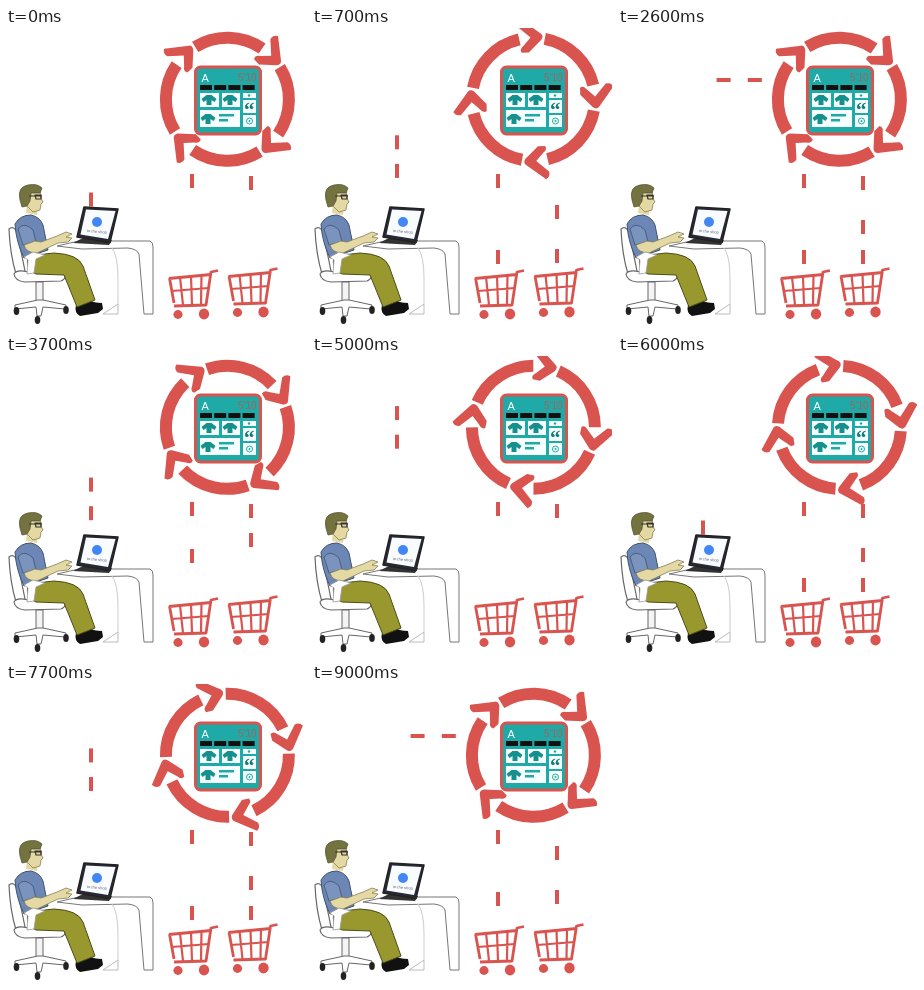
An HTML page with a canvas that plays this animation: 300x300 px, repeating every 9.2 s.

```html
<!DOCTYPE html>
<html lang="en">
<head>
<meta charset="utf-8">
<title>Online shop flow</title>
<style>
html, body { margin: 0; width: 100%; height: 100%; overflow: hidden; background: #fff; }
canvas { display: block; width: 300px; height: 300px; }
</style>
</head>
<body>
<canvas id="stage" width="300" height="300"></canvas>
<script>
const ctx = document.getElementById('stage').getContext('2d');
const RED = '#d9534f', TEAL = '#20aaa7', SKIN = '#e4d9a2', LINE = '#666';
const SANS = '"Liberation Sans", Arial, sans-serif';
const LOOP = 9200, CYCLE = 1700, STEP = 200;
const TAU = Math.PI * 2, RAD = Math.PI / 180;

function rect(x, y, w, h, color) {
  ctx.fillStyle = color;
  ctx.fillRect(x, y, w, h);
}

function shape(path, fill, stroke, width = 1) {
  const p = new Path2D(path);
  if (fill) { ctx.fillStyle = fill; ctx.fill(p); }
  if (stroke) { ctx.strokeStyle = stroke; ctx.lineWidth = width; ctx.stroke(p); }
}

function oval(x, y, rx, ry, color) {
  ctx.fillStyle = color;
  ctx.beginPath();
  ctx.ellipse(x, y, rx, ry, 0, 0, TAU);
  ctx.fill();
}

function text(str, x, y, font, color) {
  ctx.font = font;
  ctx.fillStyle = color;
  ctx.fillText(str, x, y);
}

// Six quick steps, then a longer rest on the seventh.
function stepAt(t) {
  const u = t + 100;
  return 7 * Math.floor(u / CYCLE) + Math.min(6, Math.floor(u % CYCLE / STEP));
}

// Four arrows: a body and a loose chevron each, turning a little unevenly.
function drawRing(n) {
  const turn = n - (n >= 13) - (n >= 32);
  const angle = -33 + 30 * turn + 10 * Math.cos(30 * (turn - 3.5) * RAD);
  ctx.save();
  ctx.translate(221.4, 71.3);
  ctx.rotate(angle * RAD);
  ctx.lineCap = 'butt';
  for (let i = 0; i < 4; i++) {
    ctx.strokeStyle = RED;
    ctx.lineWidth = 12;
    ctx.beginPath();
    ctx.arc(0, 0, 61.5, -86 * RAD, -20 * RAD);
    ctx.stroke();
    shape('M45 -17 Q48 -20 52 -16 L61 -10 L70 -24 Q75 -26 78 -22 L66 0 Q64 3 60 1 L46 -10 Z', RED);
    ctx.rotate(Math.PI / 2);
  }
  ctx.restore();
}

function shirt(x, y) {
  shape(`M${x} ${y} h3 l5 4 l-2 3 l-3 -2 v5 h-5 v-5 l-3 2 l-2 -3 l5 -4 Z`, '#15908d');
}

function drawPanel() {
  ctx.beginPath();
  ctx.roundRect(189.5, 39, 65, 67, 5);
  ctx.fillStyle = TEAL;
  ctx.fill();
  ctx.strokeStyle = RED;
  ctx.lineWidth = 3;
  ctx.stroke();
  text('A', 195.5, 54, '11px ' + SANS, '#fff');
  text("5'10", 232, 53, '10px ' + SANS, '#a8605a');
  for (let i = 0; i < 4; i++) rect(194 + 14.2 * i, 57, 12, 5, '#111');
  const tiles = [[194, 65, 19, 14], [216, 65, 18, 14], [237, 65, 13, 5],
    [237, 72, 13, 13], [237, 87, 13, 12], [194, 82, 40, 17]];
  for (const [x, y, w, h] of tiles) rect(x, y, w, h, '#f5ffff');
  shirt(202.5, 67);
  shirt(223.5, 67);
  shirt(201.5, 86);
  rect(213, 86, 15, 2.5, TEAL);
  rect(213, 91, 9, 2.5, TEAL);
  oval(243, 67.5, 1.2, 1.2, TEAL);
  text('“', 238, 89, 'bold 21px "Liberation Serif", serif', '#147a78');
  ctx.strokeStyle = TEAL;
  ctx.lineWidth = 1;
  ctx.beginPath();
  ctx.arc(243.5, 93, 3, 0, TAU);
  ctx.stroke();
  oval(243.5, 93, 1, 1, TEAL);
}

function drawCart(dx, dy) {
  ctx.save();
  ctx.translate(dx, dy);
  ctx.lineJoin = 'round';
  shape('M212 242.5 L205 244 L200 277 L168 278 M163 250.5 L205 246.5 M163.5 250 L168 275', null, RED, 2.8);
  shape('M174 249 L177 277 M185 248 L186 277 M195.5 247 L195 276 M165.5 263 L203 260', null, RED, 2.2);
  oval(172, 286.5, 4.6, 4.4, RED);
  oval(198, 286, 5.2, 5.4, RED);
  ctx.restore();
}

function drawChair() {
  ctx.lineJoin = 'round';
  shape('M3 201 Q7 197 11 204 L19 243 Q17 252 10 246 Q4 226 3 201 Z', '#fff', LINE, 1.2);
  shape('M8 246 Q11 241 22 244 L56 245 Q63 249 55 253 L19 254 Q9 253 8 246 Z', '#fff', LINE, 1.2);
  shape('M30 254 H37 V275 H30 Z', '#f4f4f4', LINE);
  shape('M32 272 L9 277 L9 281 L30 279 L31 288 H35 L37 279 L59 281 L60 277 L37 272 Z', '#fff', LINE);
  for (const [x, y] of [[10.5, 283], [31.5, 292], [60, 282]]) oval(x, y, 2.8, 4, '#222');
}

function drawMan() {
  shape('M70 277 L83 272 Q88 275 96 275 L97 281 L92 285 L74 288 Q68 285 70 277 Z', '#111');
  shape('M22 228 L48 225 Q72 226 77 238 L89 272 L71 279 L58 247 L30 246 Q19 242 22 228 Z', '#98982f', '#4c4c1c');
  shape('M21 176 L32 178 L31 187 L20 185 Z', SKIN);
  shape('M9 196 Q14 187 25 187 Q34 189 37 197 L42 222 L18 230 Q10 214 9 196 Z', '#6c87b5', '#42536f');
  shape('M12 201 Q18 193 27 202 L30 214 L17 217 Z', '#7a94be', '#42536f', .8);
  shape('M18 217 L29 213 L35 214 L51 208 L60 204 L66 206 L60 209 L66 210 L62 214 L52 215 L31 225 Q20 225 18 217 Z', SKIN, '#77704c', .7);
  shape('M18 229 L27 224 L39 227 L30 231 L28 245 L21 246 L22 232 Z', '#fff', '#999', .8);
  shape('M20 162 L34 162 L35 170 L37 174 L35 176 L34 182 L27 184 L20 177 Z', SKIN, '#77704c', .7);
  shape('M14 172 Q11 159 22 157 Q31 155 36 160 L34 165 L25 165 L24 173 L21 178 L16 179 Z', '#74733f', '#4c4b28', .7);
  shape('M23 168 H36 M29 167 H35 V171 H30 Z', null, '#333', 1.2);
}

function drawDesk() {
  shape('M51 218 L73 213 H144 Q147 214 147 219 V286 H138 L133 226 Q131 221 122 220 L76 221 Z', '#fff', '#777');
  shape('M97 286 L112 276 V286 Z', '#fff', '#bbb');
  shape('M106 220 Q112 228 112 250 V276', null, '#ccc');
  shape('M67 215 L77 210 L106 212 L103 217 Z', '#333');
  shape('M78 179 L112 181 L104 214.5 L71 209 Z', '#272a35', '#222', 1.5);
  shape('M80 181.5 L109.5 183 L102 211 L74.5 206.5 Z', '#f9fcff');
  oval(91, 194, 5, 5, '#4285f4');
  ctx.save();
  ctx.translate(81, 203);
  ctx.rotate(5 * RAD);
  text('to the shop', 0, 1, '4px ' + SANS, '#667');
  ctx.restore();
}

// A place on the path from the laptop up and then right to the ring.
function pathDash(i) {
  if (i < 0) return;
  if (i < 9) rect(83, 164.5 - 14.3 * i, 4, 14, RED);
  else rect(83 + 15.6 * (i - 9), 50, 14, 4, RED);
}

// Tops of the dashes above the left and the right cart, step by step.
const CART_DASHES = [
  [[146], [148]],
  [[146, 178], [148, 163]],
  [[146, 193], [148, 177]],
  [[146, 208], [162, 206]],
  [[146, 222], [177, 221]],
  [[146, 222], [148, 192, 222]],
  [[146, 222], [163, 207]]
];

function drawDashes(n) {
  pathDash(n % 13);
  pathDash(n % 13 - 2);
  CART_DASHES[n % 7].forEach((tops, side) => {
    for (const y of tops) rect(184 + 59 * side, y, 4, 14, RED);
  });
}

function draw(t) {
  const n = stepAt(t);
  rect(0, 0, 300, 300, '#fff');
  drawDashes(n);
  drawRing(n);
  drawPanel();
  drawChair();
  drawMan();
  drawDesk();
  drawCart(0, 0);
  drawCart(59.5, -2);
}

const start = performance.now();
function tick() {
  draw((performance.now() - start) % LOOP);
  requestAnimationFrame(tick);
}
tick();
</script>
</body>
</html>
```
